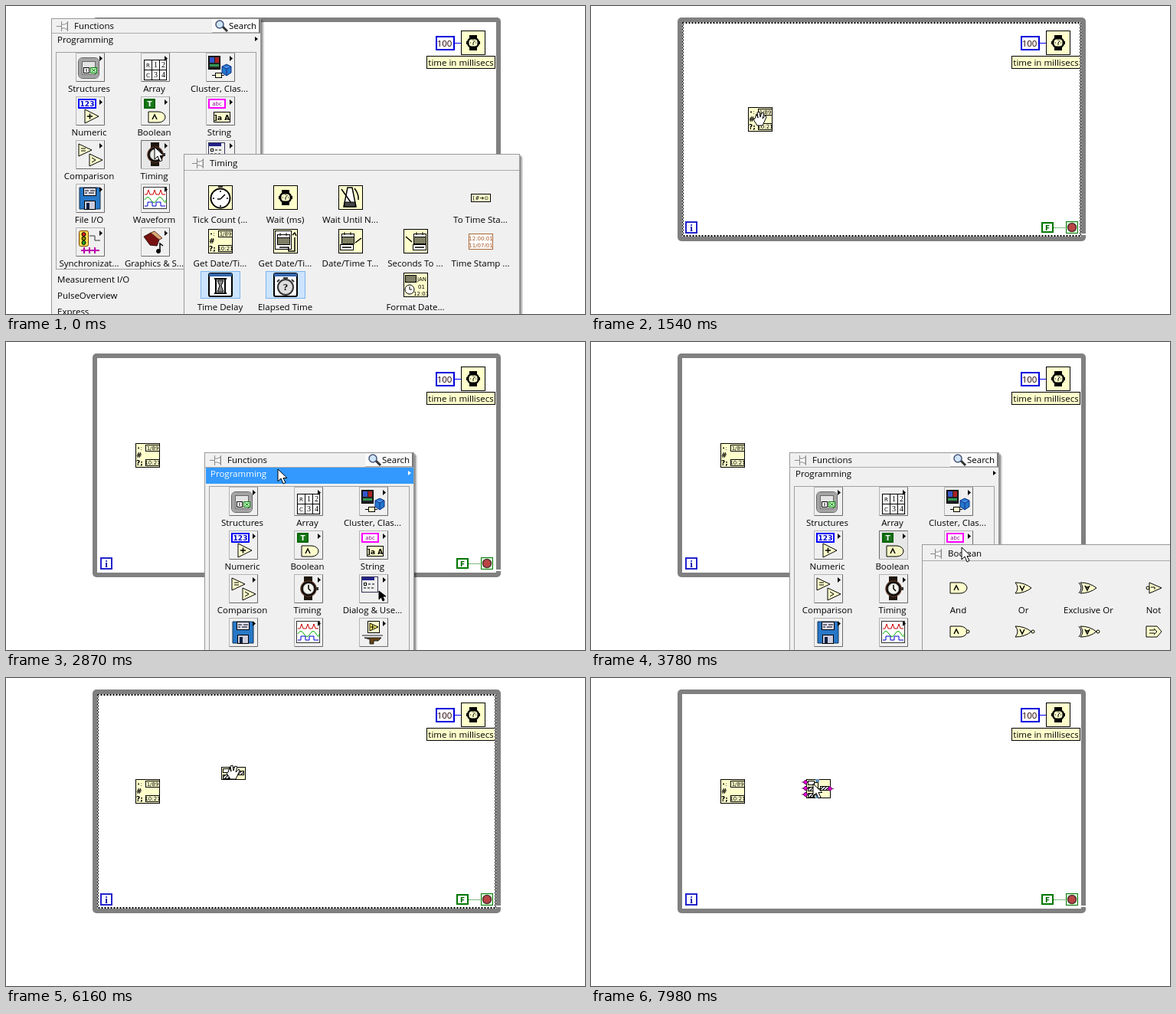
An HTML page that plays this animation: 756x402 px, repeating every 8 s.

```html
<!DOCTYPE html>
<html lang="en">
<head>
<meta charset="utf-8">
<title>Block diagram editing</title>
<style>
html, body { margin: 0; width: 100%; height: 100%; overflow: hidden; background: #fff; }
svg { display: block; width: 756px; height: 402px; }
text { font: 11.5px "Open Sans", "Noto Sans", sans-serif; white-space: pre; }
.tiny { font: 7px "DejaVu Sans", sans-serif; }
.bold { font: bold 9px "DejaVu Sans", sans-serif; }
.digit { font: 10px "Liberation Serif", serif; }
.serif { font: bold 13px "Liberation Serif", serif; }
</style>
</head>
<body>
<svg id="stage" viewBox="0 0 756 402"></svg>
<script>
const CREAM = '#ffffcc', BLUE = '#3399ff', FACE = '#f0f0f0';

// Shape helpers; a rectangle's stroke lies inside its bounds.
const rect = (x, y, w, h, fill = 'none', stroke = '#000', sw = 1, more = '') =>
  `<rect x="${x + sw / 2}" y="${y + sw / 2}" width="${w - sw}" height="${h - sw}" fill="${fill}" stroke="${stroke}" stroke-width="${sw}" ${more}/>`;
const fillRect = (x, y, w, h, fill) => `<rect x="${x}" y="${y}" width="${w}" height="${h}" fill="${fill}"/>`;
const path = (d, fill = 'none', stroke = '#000', sw = 1) =>
  `<path d="${d}" fill="${fill}" stroke="${stroke}" stroke-width="${sw}"/>`;
const circle = (x, y, r, fill = 'none', stroke = '#000', sw = 1) =>
  `<circle cx="${x}" cy="${y}" r="${r}" fill="${fill}" stroke="${stroke}" stroke-width="${sw}"/>`;
const text = (x, y, s, cls = '', fill = '#000', anchor = 'start') =>
  `<text x="${x}" y="${y}" class="${cls}" fill="${fill}" text-anchor="${anchor}">${s}</text>`;
const mid = (x, y, s, cls, fill) => text(x, y, s, cls, fill, 'middle');
const group = (x, y, body, id = '') => `<g ${id && `id="${id}"`} transform="translate(${x} ${y})">${body}</g>`;
const hatch = (x, y, w, h) => rect(x, y, w, h, 'url(#hatch)');
const checker = (x, y, w, h) => rect(x, y, w, h, 'url(#checker)');
const node = body => rect(-16, -16, 32, 32, CREAM) + body;

// Icons, each centred on 0,0
const andGate = 'M-11 -7h13a9 7 0 0 1 0 14h-13z';
const orGate = 'M-11 -7q12 0 21 7q-9 7 -21 7q6 -7 0 -14z';
const wedge = 'M-5 -3l3 6 3 -6', peak = 'M-6 3l3 -6 3 6';
const gate = (shape, mark, bubble) =>
  path(shape, CREAM) + path(mark, 'none', '#000', 1.5) + (bubble ? circle(12, 0, 2, CREAM) : '');
const xorGate = bubble => path('M-13 -7q6 7 0 14') + gate(orGate, wedge + 'M-4 -1h4', bubble);
const watch = path('M-5 -10h10v4h-10zM-5 6h10v4h-10z', '#000', 'none') +
  rect(-8, -7, 16, 14, CREAM, '#000', 2.5, 'rx="5"') + fillRect(-9, -2, 2, 4, '#000') + fillRect(7, -2, 2, 4, '#000') +
  path('M0 3v-3l2.5 -3M-4 0h1M3 0h1M0 -4v1');
const dateText = node(text(-14, -7, '•:', 'tiny') + text(-15, 3, '#', 'bold') + text(-15, 13, '?;', 'bold') +
  rect(-3, -14, 19, 9, CREAM) + mid(6.5, -7, '1/89', 'tiny') +
  rect(-3, 5, 19, 9, CREAM) + mid(6.5, 12, '10:21', 'tiny'));
const calendar = (x, y) => checker(x, y + 4, 17, 10) + rect(x, y, 17, 5, '#fff') + path(`M${x + 4} ${y - 2}v4m8 -4v4`);
const concat32 = node([-13, -4, 5].map((y, i) => (i == 1 ? rect(-12, y, 8, 8, '#fff') : checker(-12, y, 8, 8)) +
  path(`M-3 ${y + 4}h5m-2 -2l2 2l-2 2`)).join('') + checker(3, -4, 12, 8));

const screen = rect(-16, -15, 16, 18, '#222') + fillRect(-14, -13, 6, 7, '#35c') + fillRect(-7, -13, 5, 7, '#a22') + fillRect(-14, -4, 12, 3, '#395');
const icons = {
  loop: rect(-16, -13, 28, 28, '#e4e4e4', '#666', 6, 'rx="3"') + rect(-15, -12, 26, 26, 'none', '#a4a4a4', 4, 'rx="2"') +
    rect(-9, 0, 8, 8, '#fff') + rect(0, 0, 9, 8, '#cfc', '#070') + path('M-5 2v4') + path('M2 2l5 4m0 -4l-5 4', 'none', '#070'),
  array: [['R', '1', '2'], ['C', '3', '4']].map((row, j) => row.map((s, i) =>
    rect(-15 + 10 * i, -10 + 13 * j, 10 + (i < 2), 14, '#fff') + mid(-9.5 + 10 * i, 0 + 13 * j, s, i ? 'digit' : 'tiny')).join('')).join(''),
  cluster: screen + rect(-7, 7, 9, 7, CREAM) + path('M-11 10.5h4M2 10.5h3') + path('M2 -1l6 -3 6 3v8l-6 4 -6 -4z', '#27c', '#138') + path('M2 -1l6 3 6 -3M8 2v9', '#59e', '#138'),
  numeric: rect(-16, -16, 24, 13, '#fff', '#00f', 2) + mid(-4, -6, '123', 'bold', '#00c') +
    path('M-7 -2l18 9 -18 9z', CREAM) + path('M-4 7h7M-.5 3.5v7', 'none', '#000', 1.5),
  bool: rect(-15, -16, 15, 13, '#187818', '#060', 2) + mid(-7.5, -6, 'T', 'bold', '#fff') + group(2, 8, gate(andGate, peak)),
  string: rect(-16, -16, 23, 13, '#fff', '#f0f', 2) + mid(-4.5, -7, 'abc', 'tiny', '#808') +
    rect(-9, 1, 22, 14, CREAM) + mid(2, 11.5, ']a A', 'bold'),
  compare: path('M-15 -14l17 8 -17 8z', CREAM) + path('M-12 -8h6m-6 3h6') + path('M-1 -1l17 8 -17 8z', CREAM) + path('M2 4l5 3 -5 3'),
  timing: fillRect(-6, -16, 11, 31, '#201810') + circle(0, 0, 10, '#000', '#532', 1.5) + circle(0, 0, 7, '#f4f4ee', '#999') + path('M0 -5v5l3 3', 'none', '#000', 1.5) + fillRect(10, -2, 3, 4, '#333'),
  dialog: rect(-16, -16, 22, 21, '#eee', '#335') + fillRect(-15, -15, 16, 4, '#228') + rect(-13, -8, 4, 4, '#fff') + path('M-7 -6h3m2 0h3M-13 -1h3m2 0h3m2 0h3') + path('M7 3v11l3 -3 2 5 2 -1 -2 -5h4z', '#000'),
  file: path('M-14 -14h25l2 2v26h-27z', '#2878c8', '#135') + rect(-9, -14, 17, 11, '#dde') + path('M-7 -10h5m2 0h6M-7 -7h3m2 0h7') + rect(-8, 3, 15, 12, '#ccd') + fillRect(-5, 6, 4, 8, '#124'),
  wave: rect(-16, -15, 31, 29, '#fff', '#333') + path('M-14 -5h3l2 -6 2 6h4l2 -6 2 6h4l2 -6 2 6h4', 'none', '#c00') +
    path('M-14 2q4 -7 8 0t8 0 8 0 4 0', 'none', '#0a0') + path('M-14 10h4v-5h6v5h5v-5h6v5h6', 'none', '#00c'),
  app: path('M-15 4h27M-12 7h22l-4 4h-6v4h-5v-6z', '#641', '#222') + rect(-8, -15, 16, 16, CREAM) + path('M-5 -12l11 5 -11 5z', '#fe6') + path('M-4 -7h5m-2.5 -2.5v5'),
  sync: rect(-15, -15, 13, 21, '#fd5', '#740', 1, 'rx="2"') + circle(-8.5, -10, 2.5, '#d22') + circle(-8.5, -4.5, 2.5, '#880') + circle(-8.5, 1, 2.5, '#2a2') +
    path('M-12 11h24M-8 7v8M-1 7v8M6 7v8', 'none', '#b0a', 2) + path('M-1 -8h7v6h7', 'none', '#333'),
  graphics: path('M-15 -7l9 -5 11 9 -3 8 -9 -1z', '#711', '#311') + path('M-6 -12l5 -2 10 9 -4 2z', '#da7', '#632') + path('M6 12v-10l4 3', 'none', '#000', 1.5) + circle(4, 12, 2.5, '#000'),
};

function menu() {
  const items = [['Structures', 'loop'], ['Array', 'array'], ['Cluster, Clas...', 'cluster'], ['Numeric', 'numeric'],
    ['Boolean', 'bool'], ['String', 'string'], ['Comparison', 'compare'], ['Timing', 'timing'], ['Dialog &amp; Use...', 'dialog'],
    ['File I/O', 'file'], ['Waveform', 'wave'], ['Application...', 'app'], ['Synchronizat...', 'sync'], ['Graphics &amp; S...', 'graphics'], ['Report Gene...', 'dialog']];
  const row = fill => text(8, 32, 'Programming', '', fill) + path('M266 24l4 3 -4 3z', fill, 'none');
  return panel(274, 'Functions', 0) +
    fillRect(210, 2, 62, 17, '#fafafa') + path('M210 18.5h63', 'none', '#aaa') + fillRect(271, 1, 2, 18, '#777') +
    path('M224 11l6 6', 'none', '#333', 3) + circle(220, 8, 5, '#cfe4fa', '#457', 1.5) + text(232, 14, 'Search') +
    row('#000') + `<g id="rowHover">${fillRect(2, 20, 271, 21, BLUE)}${row('#fff')}</g>` +
    rect(6, 44, 262, 284, FACE, '#a0a0a0') +
    items.map(([label, icon], i) => {
      const x = 51 + 85 * (i % 3), y = 64 + 57 * Math.floor(i / 3);
      return group(x, y, rect(-19, -19, 38, 38, FACE, '#b4b4b4') + path('M-18 18.5h36.5v-37', 'none', '#6a6a6a') +
        icons[icon] + path('M12 -15l4 3.5 -4 3.5z', '#000', 'none')) + mid(x - 1.5, y + 32, label);
    }).join('') +
    group(0, 0, rect(-19, -19, 38, 38, 'rgba(0,0,0,.04)', '#b4b4b4') + path('M-18.5 18v-36.5h37', 'none', '#6a6a6a'), 'pressed') +
    ['Measurement I/O', 'PulseOverview', 'Express'].map((s, i) => text(8, 345 + 21 * i, s)).join('');
}

function panel(w, title, inset) {
  const x = 2 * inset, y = inset;
  return fillRect(4, 4, w, 420, 'rgba(0,0,0,.16)') + fillRect(2, 2, w, 420, 'rgba(0,0,0,.3)') + rect(0, 0, w, 420, FACE, '#999') +
    group(x, y, path('M7 10.5h6M13.5 4v13M14 8q3 1.5 7 -2v9q-4 -3.5 -7 -2M21.5 4v13', '#fff', '#888') + text(30, 14, title)) +
    path(`M1 ${19.5 + y}h${w - 2}`, 'none', '#aaa');
}

// hover: [column, row, full name]; items: [column, row, label, icon]
function submenu(id, x, y, w, title, hover, items) {
  const [hc, hr, name] = hover;
  return group(x, y, panel(w, title, 2) + `<g id="${id}Hover">` + fillRect(6, 23, w - 14, 14, BLUE) +
    mid(w / 2 - 1, 34, name, '', '#fff') + rect(28 + 85 * hc, 37 + 57 * hr, 40, 40, '#d4e8fc', '#66a7e8') + '</g>' +
    items.map(([c, r, label, icon]) => group(48 + 85 * c, 57 + 57 * r, icon + mid(-.5, 33, label))).join(''), id);
}

const express = icon => rect(-26, -18, 52, 36, '#cce4ff', '#7db4ee') + rect(-16, -16, 32, 32, '#fff', '#000', 2, 'rx="2"') + fillRect(-15, -15, 30, 4, '#36a') + icon;
const timingItems = [
  [0, 0, 'Tick Count (...', node(circle(0, 1, 12.5, '#fff', '#000', 2) + path('M-3 -14h6M0 2l6 -6M0 2h-4M0 -9v2M0 10v2M-10 1h2M8 1h2', 'none', '#000', 1.5))],
  [1, 0, 'Wait (ms)', node(watch)],
  [2, 0, 'Wait Until N...', node(path('M-9 12l5 -25h6l5 25z', '#fff', '#000', 1.5) + path('M-8 6h14v6h-14z', '#444') + path('M0 6l-12 -17M5 -12q6 8 5 15', 'none', '#000', 1.5))],
  [4, 0, 'To Time Sta...', rect(-13, -5, 26, 11, CREAM) + mid(0, 3, '[#➔⊙', 'tiny')],
  [0, 1, 'Get Date/Ti...', dateText],
  [1, 1, 'Get Date/Ti...', node(rect(-14, -14, 22, 25, '#fff') + calendar(-11, -9) + path('M-8 8h12v5h8v-18M9 -8l3 -3 2 4', 'none', '#000', 1.5))],
  [2, 1, 'Date/Time T...', node(calendar(-12, -10) + rect(-14, 4, 18, 8, '#fff') + path('M-11 8h12M6 2l8 -6', 'none', '#000', 1.5))],
  [3, 1, 'Seconds To ...', node(calendar(-3, -10) + rect(-4, 4, 18, 8, '#fff') + path('M-1 8h12M-13 -6l8 7', 'none', '#000', 1.5))],
  [4, 1, 'Time Stamp ...', rect(-16, -10, 32, 21, '#fff', '#a63', 1) + mid(0, -1.5, '12:00:01', 'tiny', '#a52') + mid(0, 7.5, '11/07/01', 'tiny', '#a52')],
  [0, 2, 'Time Delay', express(path('M-8 -8h16M-8 11h16M-6 -8v19M6 -8v19', 'none', '#000', 2) + path('M-4 -6h8l-3 7 3 8h-8l3 -8z', '#888', '#000'))],
  [1, 2, 'Elapsed Time', express(circle(0, 3, 10, '#ddd', '#333', 2) + path('M-3 -9h6M8 -7l3 3M-8 -7l-3 3', 'none', '#333', 2) + mid(0, 7, '?', 'serif'))],
  [3, 2, 'Format Date...', node(checker(-14, -13, 15, 10) + text(2, -5, 'JAN', 'tiny') + circle(-8, 6, 6, '#fff') + path('M-8 2v4h3') + text(3, 5, '01', 'tiny') + text(-3, 14, '12:01', 'tiny'))],
];
const booleanItems = [
  [0, 0, 'And', gate(andGate, peak)], [1, 0, 'Or', gate(orGate, wedge)], [2, 0, 'Exclusive Or', xorGate()],
  [3, 0, 'Not', path('M-6 -7l16 7 -16 7z', CREAM) + circle(-8, 0, 2, CREAM) + path('M-4 -1h5v3')],
  [0, 1, 'Not And', gate(andGate, peak, 1)], [1, 1, 'Not Or', gate(orGate, wedge, 1)], [2, 1, 'Not Exclusiv...', xorGate(1)],
  [3, 1, 'Implies', path('M-10 -7h14l6 7 -6 7h-14z', CREAM) + path('M-6 -2h7m-7 4h7M0 -4l4 4 -4 4')],
];
const stringItems = [
  [0, 0, 'String Length', rect(-16, -9, 32, 18, CREAM) + checker(-13, -4, 15, 8) + path('M4 0h9M4.5 -3v6M13.5 -3v6M6 -2l-2 2 2 2M11 -2l2 2 -2 2')],
  [1, 0, 'Concatenate...', concat32],
  [2, 0, 'String Subset', node(rect(-13, -13, 23, 8, '#fff') + checker(-6, -13, 9, 8) + path('M-13 3h8v-5m-3 3l3 -3 3 3M11 -2v6') + checker(-2, 6, 15, 7))],
  [0, 1, 'Replace Sub...', node(checker(-13, -13, 25, 8) + fillRect(-5, -12, 8, 6, '#000') + path('M-12 5q6 0 7 -6m-3 2l3 -3 3 3M10 -3v5') + checker(-2, 6, 15, 7))],
  [1, 1, 'Search and ...', node(checker(-13, -13, 11, 8) + text(2, -6, 'a→b', 'tiny') + path('M-12 4q6 0 8 -6m-3 2l3 -3 3 3') + checker(0, 2, 13, 8) + text(-13, 13, '#', 'tiny'))],
  [2, 1, 'Match Pattern', node(rect(-14, -13, 19, 10, '#fff') + text(-13, -5, 'abbc', 'tiny') + rect(-14, 2, 17, 10, '#fff') + text(-13, 9, 'b*', 'tiny') + text(7, -6, 'a', 'tiny') + text(5, 3, 'bb', 'tiny') + text(7, 12, 'c', 'tiny'))],
];

const pin = (x, y, dir) => path(`M${x} ${y}h${5 * dir}`, 'none', '#704060') + path(`M${x - 3} ${y}l3 -3 3 3 -3 3z`, '#d0c', '#606');
// Growing join node, origin at its top left
function joinNode(n) {
  const h = 8 * n + 1;
  let s = rect(0, 0, 32, h, CREAM);
  for (let i = 0; i < n; i++) {
    const y = 1 + 8 * i;
    s += (i ? hatch(2, y + 1, 9, 6) : rect(2, y + 1, 9, 6, '#fff')) + path(`M11 ${y + 3.5}h4`);
  }
  s += path(`M15.5 4v${h - 8}M15 ${h / 2}h5`) + hatch(18, Math.floor(h / 2) - 3, 12, 6);
  s += '<g class="pins">';
  for (let i = 0; i < n; i++) s += pin(-1, 4 + 8 * i, -1);
  return s + pin(31, h / 2, 1) + fillRect(12, 0, 5, 4, '#6a94c0') + fillRect(12, h - 4, 5, 4, '#6a94c0') + '</g>';
}

const scene = rect(113, 15, 533, 292, '#fff', '#808080', 6, 'rx="2"') + fillRect(640, 297, 7, 2, '#fff') +
  rect(561, 39, 25, 19, '#fff', '#00d', 2) + mid(572.5, 53, '100', '', '#200') + path('M586 48.5h8', 'none', '#00f') +
  group(610, 48, node(watch)) + rect(549, 65, 90, 17, CREAM) + mid(594, 78, 'time in millisecs') +
  rect(123, 281, 16, 16, '#fff', '#22c', 2) + mid(131, 293.5, 'i', 'serif', '#00a') +
  rect(588, 282, 16, 14, '#fff', '#070', 2) + mid(596, 292.5, 'F', 'bold', '#060') +
  `<path d="M604 289.5h16" stroke="#070" stroke-dasharray="1 1"/>` +
  rect(620, 281, 16, 16, '#dfd', '#070') + circle(628, 289, 5.5, '#b44', '#533', 1.5);

const ants = rect(119, 21, 521, 280, 'none', '#fff', 2) +
  rect(119, 21, 521, 280, 'none', '#000', 1, 'stroke-dasharray="2 2"') +
  rect(120, 22, 519, 278, 'none', '#000', 1, 'stroke-dasharray="2 2" stroke-dashoffset="1"');

const stage = document.getElementById('stage');
stage.innerHTML = `<defs><pattern id="hatch" width="4" height="4" patternUnits="userSpaceOnUse">
  ${fillRect(0, 0, 4, 4, '#fff')}<path d="M0 4l4 -4M-1 1l2 -2M3 5l2 -2" stroke="#000" stroke-width="1.2"/></pattern>
  <pattern id="checker" width="2" height="2" patternUnits="userSpaceOnUse">
  ${fillRect(0, 0, 2, 2, CREAM) + fillRect(0, 0, 1, 1, '#000') + fillRect(1, 1, 1, 1, '#000')}</pattern></defs>` +
  scene + `<g id="ants">${ants}</g>` +
  group(185, 148, dateText + '<g id="datePins">' + pin(-17, -10, -1) + pin(-17, 10, -1) + pin(16, -10, 1) + pin(16, 10, 1) + '</g>', 'date') +
  group(0, 0, joinNode(2), 'join2') + group(281, 132, joinNode(3), 'join3') +
  group(59, 16, menu(), 'menu') +
  submenu('timing', 232, 193, 439, 'Timing', [0, 1, 'Get Date/Time String'], timingItems) +
  submenu('boolean', 432, 264, 439, 'Boolean', [0, 0, 'And'], booleanItems) +
  submenu('string', 517, 264, 524, 'String', [1, 0, 'Concatenate Strings'], stringItems) +
  group(0, 0, path('M-7 -1l2 -6 2 5 -1 -7 3 -1 1 7 2 -6 3 1 -2 7 4 -4 1 2 -5 11h-7l-5 -8z', '#fff'), 'hand') +
  group(0, 0, path('M0 0v16l4 -4 3 7 3 -1.5 -3 -6h5z', '#fff'), 'arrow') +
  group(0, 0, path('M0 -9l4 5h-3v8h3l-4 5 -4 -5h3v-8h-3z', '#000', '#fff'), 'resize');

const $ = id => document.getElementById(id);
const show = (id, on) => { $(id).style.display = on ? '' : 'none'; };
const place = (id, x, y) => $(id).setAttribute('transform', `translate(${x} ${y})`);

// Pointer path: time, x, y
const track = [[0, 194, 184], [70, 237, 183], [140, 237, 183], [490, 262, 268], [700, 282, 324], [840, 282, 312],
  [1190, 282, 312], [1330, 258, 190], [1540, 221, 148], [1960, 185, 148], [2310, 190, 150], [2520, 259, 144],
  [2660, 259, 144], [2870, 355, 166], [3010, 380, 205], [3150, 393, 279], [3430, 393, 279], [3780, 484, 268],
  [3920, 489, 258], [4480, 489, 258], [4900, 609, 305], [4970, 609, 305], [5250, 626, 312], [5740, 626, 312],
  [5810, 553, 281], [5950, 385, 203], [6020, 371, 172], [6160, 297, 124], [6230, 297, 124], [6510, 297, 140],
  [7350, 297, 140], [7560, 296, 148], [7770, 296, 157], [7910, 290, 138], [8000, 290, 138]];

function pointer(t) {
  const i = track.findIndex(k => k[0] > t);
  const [t0, x0, y0] = track[i - 1], [t1, x1, y1] = track[i];
  const p = (t - t0) / (t1 - t0);
  return [Math.round(x0 + (x1 - x0) * p), Math.round(y0 + (y1 - y0) * p)];
}

const STEP = 70, LOOP = 8000;
function draw() {
  const t = Math.floor((performance.now() % LOOP) / STEP) * STEP;
  const within = (a, b) => t >= a && t < b;
  const [x, y] = pointer(t);
  const drag1 = within(1190, 2030), drag2 = within(5740, 6720);
  const first = t < 1190, resizing = within(7490, 7910);

  show('menu', first || within(2590, 5740));
  place('menu', first ? 59 : 259, first ? 16 : 144);
  show('rowHover', within(2590, 3150) && y >= 164 && y < 185);
  show('pressed', first || within(3150, 5740));
  place('pressed', t >= 3920 ? 221 : 136, first ? 178 : 121);
  show('timing', first);
  show('timingHover', t >= 560);
  show('boolean', within(3430, 3920));
  show('booleanHover', false);
  show('string', within(4270, 5740));
  show('stringHover', t >= 4830);

  show('ants', within(1190, 2170) || drag2);
  show('date', !first);
  place('date', drag1 ? x : 185, drag1 ? y : 148);
  show('datePins', within(2310, 2380));
  show('join2', within(5740, 7700));
  place('join2', drag2 ? x - 16 : 281, drag2 ? y - 8 : 132);
  document.querySelector('#join2 .pins').style.display = t >= 7210 ? '' : 'none';
  show('join3', t >= 7700);

  show('hand', drag1 || drag2);
  show('resize', resizing);
  show('arrow', first || within(2310, 5740) || (t >= 6720 && !resizing));
  for (const id of ['hand', 'arrow', 'resize']) place(id, x, y);
  requestAnimationFrame(draw);
}
draw();
</script>
</body>
</html>
```
